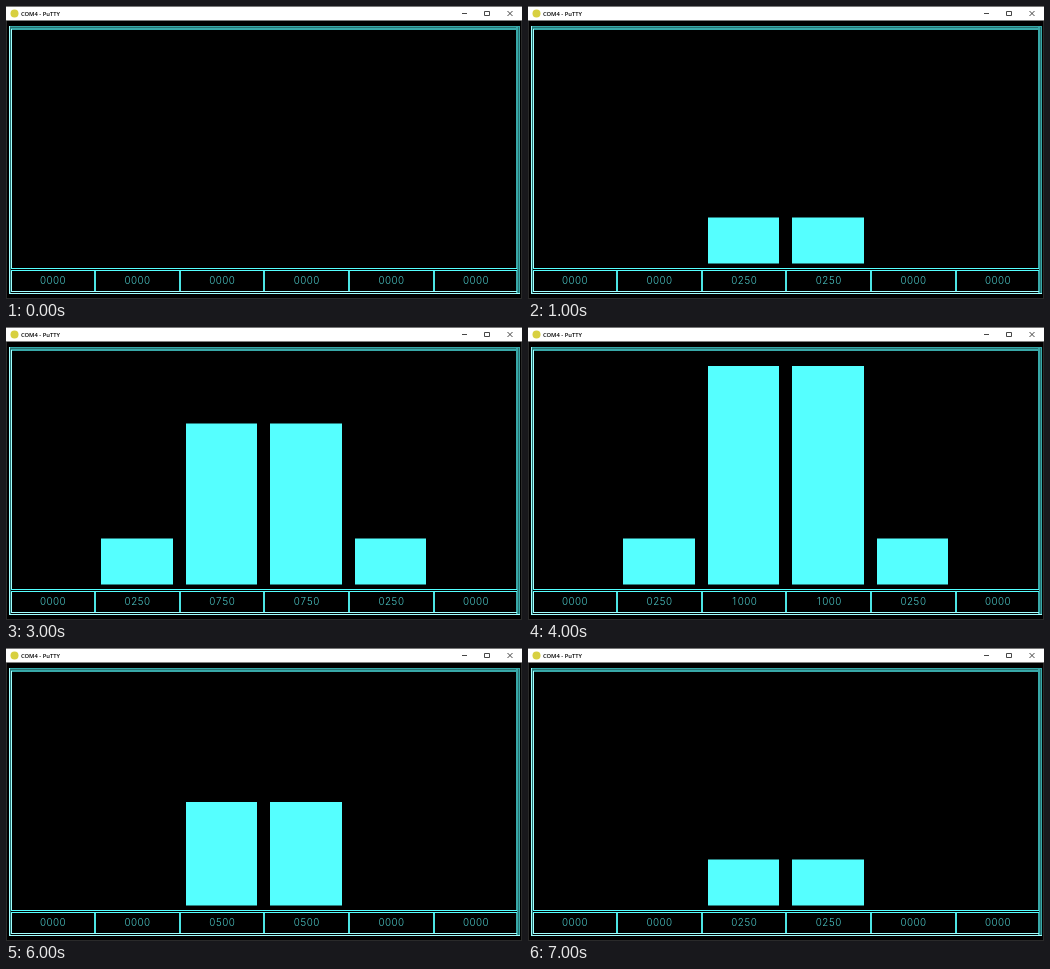
An HTML page with a canvas for the animation above (8 s loop, 516 by 293 pixels).

```html
<!DOCTYPE html>
<html>
<head>
<meta charset="utf-8">
<style>
  html, body { margin: 0; overflow: hidden; background: #000; }
  canvas { display: block; }
</style>
</head>
<body>
<canvas id="stage" width="516" height="293"></canvas>
<script>
const ctx = document.getElementById('stage').getContext('2d');
const CYAN = '#55ffff', TEAL = '#38a8a8', DARK = '#267272', PALE = '#a0ffff';
const COLUMN = 84.6, ROW = 11.5, CHAR = 6.5, BASE = 257.5;

// One step per second: value of the middle pair, value of the pair beside it
const steps = [[0, 0], [250, 0], [500, 0], [750, 250], [1000, 250], [750, 250], [500, 0], [250, 0]];

function rect(color, x, y, w, h) {
  ctx.fillStyle = color;
  ctx.fillRect(x, y, w, h);
}

function text(string, x, y, font, color, align) {
  ctx.font = font;
  ctx.fillStyle = color;
  ctx.textAlign = align;
  ctx.fillText(string, x, y);
}

function drawTitleBar() {
  rect('#fff', 0, 0, 516, 14.5);
  rect('#777', 0, 0, 516, 1);
  ctx.fillStyle = '#d8d040';
  ctx.beginPath();
  ctx.arc(8.5, 7.5, 4, 0, 7);
  ctx.fill();
  text('COM4 - PuTTY', 15, 10, '600 5.8px "Open Sans", sans-serif', '#000', 'left');

  ctx.strokeStyle = '#333';
  ctx.lineWidth = 0.9;
  ctx.beginPath();
  ctx.moveTo(456, 7.5);
  ctx.lineTo(461, 7.5);
  ctx.rect(478.5, 5.5, 5, 4);
  ctx.moveTo(501.5, 5);
  ctx.lineTo(506.5, 10);
  ctx.moveTo(506.5, 5);
  ctx.lineTo(501.5, 10);
  ctx.stroke();
}

function drawFrame() {
  // Window edge
  rect('#2a2a2a', 0, 15, 1, 278);
  rect('#2a2a2a', 515, 15, 1, 278);
  rect('#2a2a2a', 0, 292, 516, 1);

  // Blurred double lines at the top and right
  rect(TEAL, 3, 20, 511, 4);
  rect(DARK, 4, 21, 509, 1);
  rect(TEAL, 510, 20, 4, 268);
  rect(DARK, 512, 21, 1, 266);

  rect(PALE, 3, 20, 1, 268);
  rect(DARK, 4, 21, 1, 266);
  rect(PALE, 5, 23, 1, 263);
  rect(CYAN, 5, 262, 506, 1);
  rect('#000', 5, 263, 506, 1);
  rect(CYAN, 5, 264, 506, 1);
  rect(PALE, 5, 285, 506, 1);
  rect(PALE, 3, 287, 511, 1);
  for (let i = 1; i < 6; i++) rect('#4ce4e4', Math.floor(4 + i * COLUMN), 265, 2, 20);
}

function drawBar(value, i) {
  const left = Math.round(10.3 + i * COLUMN);
  const right = Math.round(81.9 + i * COLUMN);
  const height = (value / 50 - 1) * ROW;
  rect(CYAN, left, BASE - height, right - left, height);
}

function drawValue(value, i) {
  [...String(value).padStart(4, '0')].forEach((digit, j) =>
    text(digit, 46.8 + i * COLUMN + (j - 1.5) * CHAR, 278,
      '300 9.8px Inter, sans-serif', '#4cc8c8', 'center'));
}

function draw(now) {
  const [middle, side] = steps[Math.floor(now / 1000) % steps.length];
  rect('#000', 0, 0, 516, 293);
  drawTitleBar();
  drawFrame();
  [0, side, middle, middle, side, 0].forEach((value, i) => {
    if (value) drawBar(value, i);
    drawValue(value, i);
  });
  requestAnimationFrame(() => draw(performance.now()));
}

draw(0);
</script>
</body>
</html>
```
